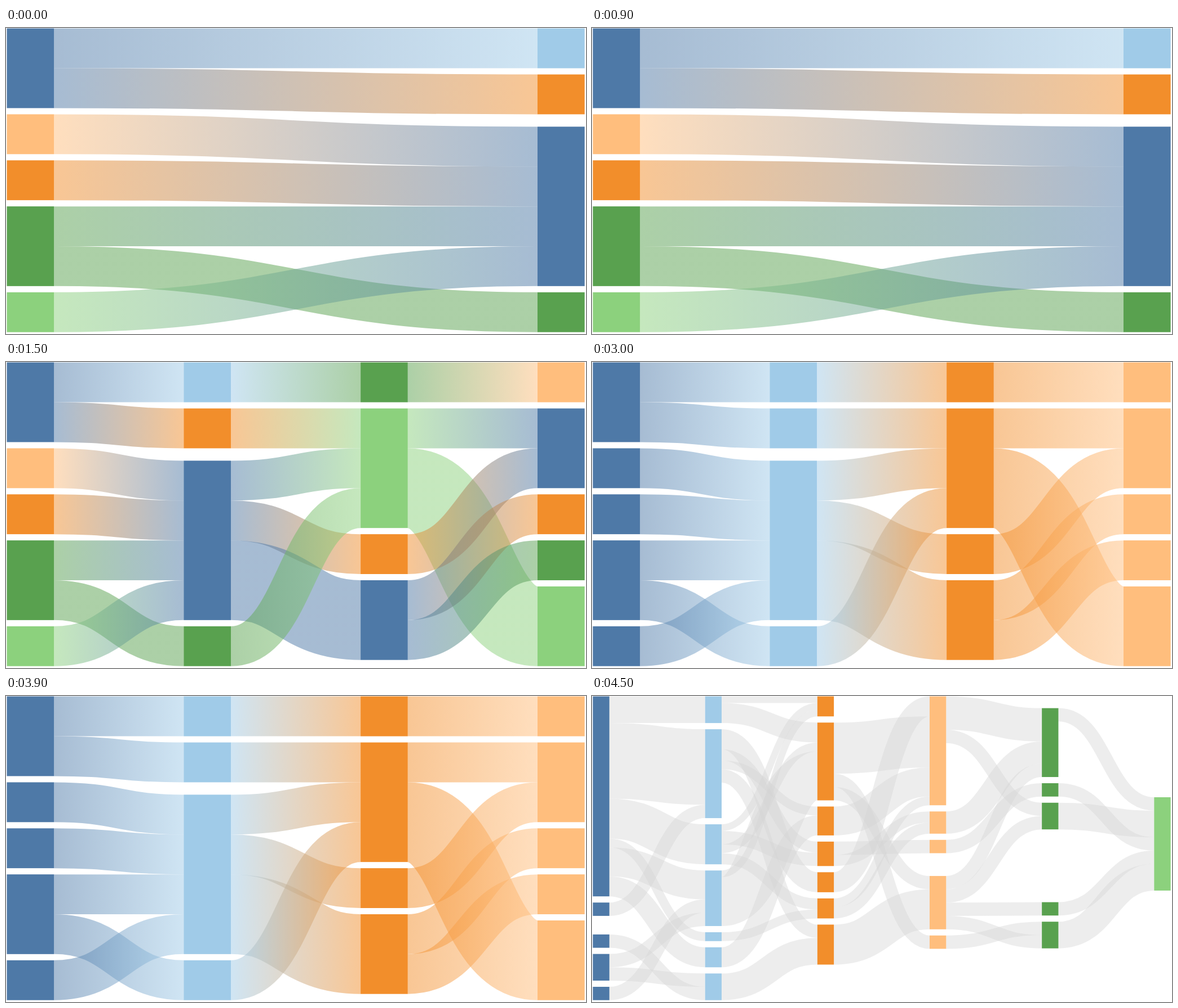
Recreate the animation shown at these times as an HTML page. Size 1029x544 px, loop 6000 ms.

```html
<!DOCTYPE html>
<html lang="en">
<head>
<meta charset="utf-8">
<title>Sankey variations</title>
<style>
html, body { margin: 0; width: 100%; height: 100%; overflow: hidden; background: #fff; }
svg { display: block; width: 100%; height: 100%; }
</style>
</head>
<body>
<svg id="stage" viewBox="0 0 1029 544"></svg>
<script>
const NS = 'http://www.w3.org/2000/svg';
const LEFT = 1.5, RIGHT = 1026.6, TOP = 0.7, GAP = 11, HOLD = 1500;
const COLORS = {
  B: '#4e79a7', b: '#a0cbe8', O: '#f28e2b',
  o: '#ffbe7d', G: '#59a14f', g: '#8cd17d'
};
const stage = document.getElementById('stage');

function add(parent, tag, attrs) {
  const el = document.createElementNS(NS, tag);
  for (const k in attrs) el.setAttribute(k, attrs[k]);
  return parent.appendChild(el);
}

// Nodes of a column are lettered from the top. Each flow maps a source to
// its targets in the next column; node heights follow from the flow sums.
// "shift" pushes a node, and those below it, further down.
const coarse = {
  unit: 70.857,
  nodeWidth: 83.7,
  shift: [{}, { c: GAP }, {}, {}],
  flows: [
    { a: { a: 1, b: 1 }, b: { c: 1 }, c: { c: 1 }, d: { c: 1, d: 1 }, e: { c: 1 } },
    { a: { a: 1 }, b: { b: 1 }, c: { b: 1, c: 1, d: 2 }, d: { b: 1 } },
    { a: { a: 1 }, b: { b: 1, e: 2 }, c: { b: 1 }, d: { c: 1, d: 1 } }
  ]
};

const fine = {
  unit: 3.95,
  nodeWidth: 29.3,
  shift: [{ c: 2 * GAP }, {}, {}, { d: 29.5 }, { a: 20.9, d: 118.4 }, { a: 179.3 }],
  flows: [
    { a: { a: 12, b: 34, c: 18, e: 4, d: 13, f: 9 }, b: { b: 6 },
      e: { d: 6 }, d: { d: 6, g: 6 }, c: { g: 6 } },
    { a: { a: 3, b: 9 }, b: { e: 9, d: 5, c: 4, g: 6 }, c: { a: 3, d: 6, b: 4, f: 5 },
      d: { a: 3, b: 22 }, e: { f: 4 }, f: { c: 9 }, g: { g: 12 } },
    { e: { a: 9 }, b: { a: 23, e: 6, d: 6 }, c: { a: 13 },
      d: { c: 6, b: 5 }, f: { a: 4, b: 5 }, g: { d: 18 } },
    { a: { a: 15, c: 6 }, b: { a: 10 }, c: { b: 6 },
      e: { e: 6 }, d: { a: 6, c: 6, d: 6, e: 6 } },
    { a: { a: 6 }, c: { a: 12 }, b: { a: 6 }, d: { a: 6 }, e: { a: 12 } }
  ]
};

const pair = { ...coarse, shift: coarse.shift.slice(0, 2), flows: coarse.flows.slice(0, 1) };

// One string per column; a single letter colours the whole column.
const scenes = [
  { chart: pair, paint: ['BoOGg', 'bOBG'] },
  { chart: coarse, paint: ['BoOGg', 'bOBG', 'GgOB', 'oBOGg'] },
  { chart: coarse, paint: ['B', 'b', 'O', 'o'] },
  { chart: fine, paint: ['B', 'b', 'O', 'o', 'G', 'g'], plain: true }
];

function listLinks(flow = {}) {
  return Object.entries(flow).flatMap(([s, targets]) =>
    Object.entries(targets).map(([t, size]) => ({ s, t, size })));
}

function sumBy(links, end) {
  const sums = {};
  for (const l of links) sums[l[end]] = (sums[l[end]] || 0) + l.size;
  return sums;
}

function placeNodes({ unit, nodeWidth, shift, flows }, paint) {
  const step = (RIGHT - LEFT - nodeWidth) / flows.length;
  return shift.map((extra, c) => {
    const outs = sumBy(listLinks(flows[c]), 's');
    const ins = sumBy(listLinks(flows[c - 1]), 't');
    const names = Object.keys({ ...outs, ...ins }).sort();
    const nodes = {};
    let y = TOP;
    names.forEach((name, i) => {
      y += extra[name] || 0;
      const h = unit * Math.max(outs[name] || 0, ins[name] || 0);
      const color = COLORS[paint[c][i] || paint[c][0]];
      nodes[name] = { x: LEFT + c * step, y, h, color, out: y, in: y };
      y += h + GAP;
    });
    return nodes;
  });
}

function gradient(group, id, x1, x2, from, to) {
  const g = add(group, 'linearGradient', { id, gradientUnits: 'userSpaceOnUse', x1, x2, y1: 0, y2: 0 });
  add(g, 'stop', { offset: 0, 'stop-color': from });
  add(g, 'stop', { offset: 1, 'stop-color': to });
  return `url(#${id})`;
}

function drawLink(group, chart, s, t, size, id, plain) {
  const w = size * chart.unit;
  const x0 = s.x + chart.nodeWidth, x1 = t.x, mid = (x0 + x1) / 2;
  const y0 = s.out + w / 2, y1 = t.in + w / 2;
  s.out += w;
  t.in += w;
  add(group, 'path', {
    d: `M${x0},${y0}C${mid},${y0} ${mid},${y1} ${x1},${y1}`,
    fill: 'none',
    stroke: plain ? '#d3d3d3' : gradient(group, id, x0, x1, s.color, t.color),
    'stroke-opacity': plain ? 0.4 : 0.5,
    'stroke-width': w
  });
}

function build({ chart, paint, plain }, n) {
  const group = add(stage, 'g', { display: 'none' });
  const cols = placeNodes(chart, paint);
  chart.flows.forEach((flow, c) => {
    for (const { s, t, size } of listLinks(flow)) {
      drawLink(group, chart, cols[c][s], cols[c + 1][t], size, `fade${n}-${c}-${s}${t}`, plain);
    }
  });
  for (const { x, y, h, color } of cols.flatMap(Object.values)) {
    add(group, 'rect', { x, y, width: chart.nodeWidth, height: h, fill: color });
  }
  return group;
}

const groups = scenes.map(build);
const start = performance.now();

function render(ms) {
  const active = Math.floor(ms / HOLD) % groups.length;
  groups.forEach((g, i) => g.setAttribute('display', i === active ? 'inline' : 'none'));
}

function tick() {
  render(performance.now() - start);
  requestAnimationFrame(tick);
}
tick();
</script>
</body>
</html>
```
